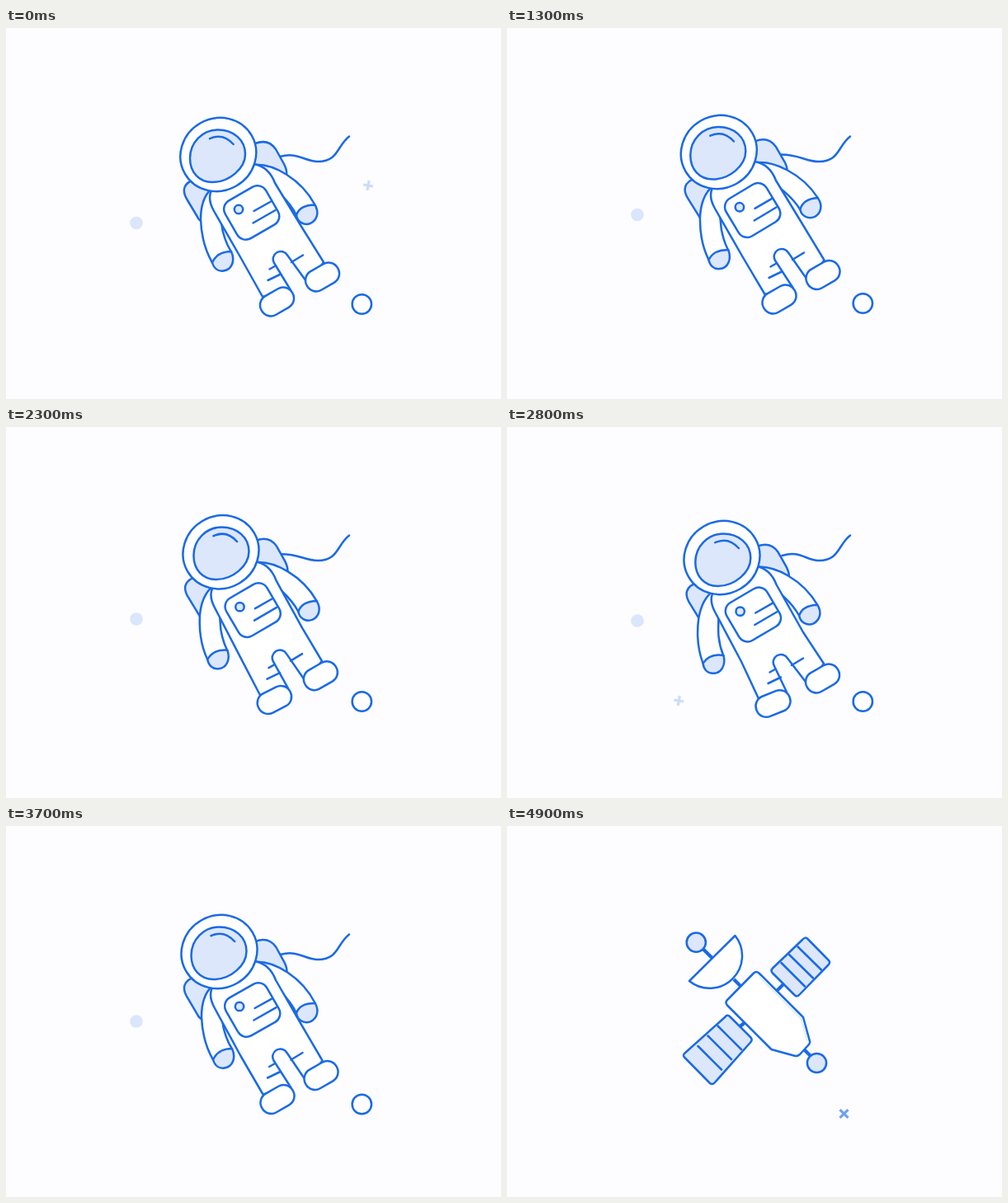
An HTML page for the animation above (5000 ms loop, 600 by 450 pixels).

```html
<!DOCTYPE html>
<html lang="en">
<head>
<meta charset="utf-8">
<title>Space drift</title>
<style>
  html, body { margin: 0; width: 100%; height: 100%; overflow: hidden; background: #fdfcff; }
  svg { display: block; width: 100vw; height: 100vh; }
  .ink { fill: #fff; stroke: #1a6ae6; stroke-width: 2.5; stroke-linecap: round; stroke-linejoin: round; }
  .pale { fill: #dce7fb; }
  .none { fill: none; }
  .bar { stroke-width: 4.2; stroke-linecap: butt; }
  .spark { fill: none; stroke: #1a6ae6; stroke-width: 3.2; }
</style>
</head>
<body>
<svg viewBox="0 0 600 450">
  <g id="walk">
    <circle id="dot" cx="158" r="7.8" fill="#dae6fc"/>
    <circle id="ring" class="ink" cx="431.3" r="11.7"/>
    <path id="sparkA" class="spark"/>
    <path id="sparkB" class="spark"/>
    <path id="tether" class="ink none"/>
    <g id="man" class="ink">
      <path id="pack" class="pale" d="M230 183C214 188 213 198 220 209L232 229Q234 234 240 236L340 178Q341 173 337 165L327 147Q318 134 302 140Z"/>
      <g id="armL">
        <path d="M248 196Q236 208 236 232Q237 262 250 284.500L273 271.5Q263 255 261 236L255 196Z"/>
        <path class="pale" d="M250 284.500Q256 271 273 271C278 282 274 293 264 294.500C257 295.500 252 291.500 250 284.500Z"/>
      </g>
      <g id="armR">
        <path d="M300 166C325 164 358 184 374.5 214.5L352 227Q346 215 334 203L310 180Z"/>
        <path class="pale" d="M352 227Q356 214.500 374.5 214.5C380 224 377 233 369 237C361 240 353 235 352 227Z"/>
      </g>
      <path id="suit"/>
      <path id="knees" class="none" d="M319.5 292.5L326.5 288.5M317.5 306L333 298.5M346 284L360 275.5"/>
      <rect id="footL" x="-21.5" y="-13" width="43" height="26" rx="12.6"/>
      <rect id="footR" x="-21.5" y="-13" width="43" height="26" rx="12.6"/>
      <g id="panel">
        <rect x="-28.5" y="-26.5" width="57" height="53" rx="12" transform="translate(297.7 224) rotate(-30)"/>
        <circle class="pale" cx="282" cy="220" r="5.2"/>
        <path class="none" d="M300.500 222L321 210.500M299.5 236.5L326.500 221"/>
      </g>
      <ellipse id="helmet" rx="46.600" ry="43.900"/>
      <g id="visor">
        <path class="pale" d="M257 123.5C276 123.5 290 136 290 153C290 170 271 187 250 187C234 187 223 175 223 158C223 139 238 123.5 257 123.5Z"/>
        <path class="none" d="M247 134.2Q263 126.800 275.600 141"/>
      </g>
    </g>
  </g>

  <g id="orbit">
    <g id="sat" class="ink">
      <path class="bar" d="M237 148.5L249 160.5M275 186L284 195M327 200L336 191M280 245L290 237M359 270L369 280"/>
      <circle class="pale" cx="229.3" cy="141.2" r="11.6"/>
      <path d="M276.5 133A39.3 39.3 0 0 1 221 188Z"/>
      <path class="pale" d="M358.5 137.5Q361.5 134 364.5 137L389.5 162.5Q392.5 165.5 389.5 168.5L354.5 204.5Q351.5 208 348.5 205L322 178.5Q319 175.5 322 172.5Z"/>
      <path class="none" d="M352.5 146.5L381 174.5M342 156L371 184.5M332.5 166L361 194.5"/>
      <path class="pale" d="M264 232Q267 228 270 231L295 256Q298 259 295.5 262L252 311Q249 314.5 246 312L215.5 281Q212.5 278 215.5 275.5Z"/>
      <path class="none" d="M255.5 242.5L284 271M243.5 254.5L272 283M231.5 267L260 295.5"/>
      <path d="M299 178.5Q302 175.5 305.5 178.5L359 232L367 261Q367.5 263.5 365.5 265.5L355 277Q352.5 279.5 349.5 279L320.5 271L267 217.5Q264 214 267 211Z"/>
      <path fill="none" stroke="#e2eefa" stroke-width="2.5" d="M307 183.5L356.5 233.5L363.5 259"/>
      <circle class="pale" cx="375.5" cy="287.5" r="11.6"/>
    </g>
    <path id="sparkC" class="spark"/>
  </g>
</svg>
<script>
const LOOP = 5000, STEP = 100, CUT = 4600, CYCLE = 3900;
const keys = [0, 500, 1300, 1900, 2800, 3700];

// Offsets from the rest pose at each key time
const tracks = {
  bodyX:  [0, -2, 0, 2, .7, 1],
  bodyY:  [0, 4, -3, -9.5, 3.5, -1],
  headX:  [0, -3, -.5, 2.6, 3.2, 1.2],
  headY:  [0, 3.3, -3, -10.3, 5, -1],
  visorX: [0, -4.5, -.7, 3, 5.3, 1.5],
  visorY: [0, 4, -3.5, -11.5, 6, -1],
  packX:  [0, -1, -.8, .5, 1.5, .3],
  packY:  [0, 2, -3, -11, 4.5, 0],
  armL:   [0, 5.4, 3.9, 2.1, 9.3, 0],
  armR:   [0, -9, -4.6, -.8, -2, 1.3],
  crotchX: [0, .7, 0, -1, -1, -.5],
  crotchY: [0, 1, -3, -8, 5, -.5],
  footLX: [0, -1.5, 1.5, 0, -6, .5],
  footLY: [0, .7, -3, -8, 3.5, -.5],
  footLA: [0, 4, 0, -1, 8, 0],
  footRX: [0, 4, -.5, -3, -1, -1.5],
  footRY: [0, -2, -2.5, -6.3, 3, .5],
  dot:    [236.5, 234, 226.5, 231, 235, 237],
  ring:   [335, 331, 334, 333, 333, 337.5],
  ropeY:  [156, 157, 153.5, 151, 156, 156],
  ropeC:  [150, 151, 153, 157, 149, 150]
};

const el = {};
document.querySelectorAll('[id]').forEach(n => el[n.id] = n);
const set = (id, name, value) => el[id].setAttribute(name, value);
const move = (id, x, y, more = '') => set(id, 'transform', `translate(${x} ${y}) ${more}`);

// Smooth cyclic curve through the keys, flat at turning points
function sample(vals, t) {
  const n = keys.length;
  const time = i => keys[(i + n) % n] + Math.floor(i / n) * CYCLE;
  const val = i => vals[(i + n) % n];
  const slope = i => {
    const a = val(i) - val(i - 1), b = val(i + 1) - val(i);
    return a * b <= 0 ? 0 : (a + b) / (time(i + 1) - time(i - 1));
  };
  let i = n - 1;
  while (keys[i] > t) i--;
  const d = time(i + 1) - time(i), u = (t - time(i)) / d, v = 1 - u;
  return val(i) * v * v * (1 + 2 * u) + val(i + 1) * u * u * (3 - 2 * u)
    + d * u * v * (slope(i) * v - slope(i + 1) * u);
}

function cross(id, x, y, r, angle, opacity) {
  set(id, 'd', `M${-r} 0H${r}M0 ${-r}V${r}`);
  move(id, x, y, `rotate(${angle})`);
  set(id, 'opacity', opacity);
}

function twinkle(id, x, y, start, t) {
  const p = ((t - start + CYCLE) % CYCLE) / 500;
  const on = p < 1 ? .62 * Math.sin(Math.PI * p) ** 2 : 0;
  cross(id, x, y, 4.5 + 7.5 * p, 50 * p, on);
}

function drawWalk(t) {
  const p = {};
  for (const name in tracks) p[name] = sample(tracks[name], t);
  const bob = t > 1900 && t < 3700 ? 2.2 * Math.sin(2 * Math.PI * (t - 1900) / 1800) : 0;
  // The torso leans along with the swinging right arm
  const lean = p.armR * .22;
  const tilt = `rotate(${lean} 297.7 224)`;

  move('man', 0, bob);
  move('pack', p.packX, p.packY, `rotate(${lean} 325 165)`);
  move('panel', p.bodyX, p.bodyY, tilt);
  move('helmet', 257.3 + p.headX, 153.5 + p.headY, 'rotate(-30)');
  move('visor', p.visorX, p.visorY);
  move('knees', p.crotchX, p.crotchY);
  move('armL', p.bodyX, p.bodyY, `rotate(${p.armL} 252 203)`);
  move('armR', p.bodyX, p.bodyY, `${tilt} rotate(${p.armR - lean} 312 172)`);
  move('footL', 328.5 + p.footLX, 332 + p.footLY, `rotate(${p.footLA - 30})`);
  move('footR', 383.5 + p.footRX, 302 + p.footRY, 'rotate(-30)');

  const at = part => (x, y) => `${x + p[part + 'X']} ${y + p[part + 'Y']}`;
  const b = at('body'), c = at('crotch'), l = at('footL'), r = at('footR');
  set('suit', 'd', `M${b(252, 193)}Q${b(242, 204)} ${b(252, 222)}L${c(285, 279.5)}L${l(311, 326)}`
    + `L${l(345, 318)}L${c(325, 285)}A9.2 9.2 0 0 1 ${c(341, 275.5)}L${r(366, 310)}`
    + `L${r(385, 284)}L${c(360, 244)}L${b(326, 188)}Q${b(318.5, 168)} ${b(300, 165)}Z`);

  const ropeX = 332 + p.packX;
  set('tether', 'd', `M${ropeX} ${p.ropeY + bob / 2}C${ropeX + 22} ${p.ropeC} 362 162 378 162`
    + 'C403 162 401 143 416 131.5');
  set('dot', 'cy', p.dot);
  set('ring', 'cy', p.ring);
  twinkle('sparkA', 439, 191, -100, t);
  twinkle('sparkB', 208.3, 332, 2700, t);
}

function drawOrbit(t) {
  const left = 4900 - t;
  move('sat', 0, left * .006);
  cross('sparkC', 408.5, 349, 7, 45 - left * .02, .62);
}

function frame(now) {
  const t = Math.floor(now % LOOP / STEP) * STEP;
  const orbit = t >= CUT;
  set('walk', 'display', orbit ? 'none' : 'inline');
  set('orbit', 'display', orbit ? 'inline' : 'none');
  if (orbit) drawOrbit(t);
  else drawWalk(t % CYCLE);
}

const begin = performance.now();
function tick() {
  frame(performance.now() - begin);
  requestAnimationFrame(tick);
}
tick();
</script>
</body>
</html>
```
